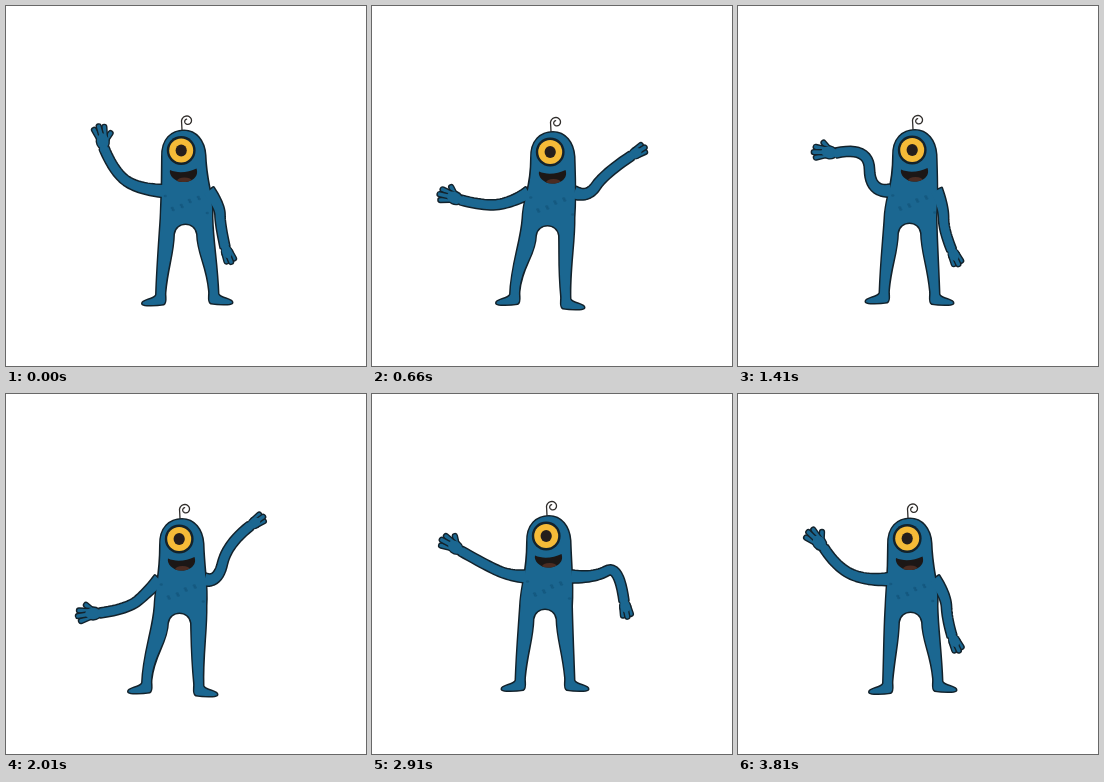
An HTML page with a canvas for the animation above (3870 ms loop, 360 px wide and 360 px high).

```html
<!DOCTYPE html>
<html lang="en">
<head>
<meta charset="utf-8">
<title>Dancing one-eyed creature</title>
<style>
html, body { margin: 0; width: 100%; height: 100%; overflow: hidden; background: #fff; }
canvas { display: block; width: 360px; height: 360px; }
</style>
</head>
<body>
<canvas id="stage" width="360" height="360"></canvas>
<script>
const ctx = document.getElementById('stage').getContext('2d');
const SKIN = '#1b6791', INK = '#13222b', LOOP = 3870;

// step, head x, head top, hip x, crotch y, left ankle x, left sole y, right ankle x, right sole y
const bodyKeys = [
  [0, 178, 124, 180.5, 218, 154.5, 300, 208, 299],
  [14, 181, 125.5, 176.5, 219.5, 142.5, 299.5, 194, 304],
  [29, 177, 123.5, 172.5, 217, 146, 298, 197, 299.5],
  [41, 176, 124.5, 174.5, 219, 140.5, 300, 193, 303],
  [59, 177, 121.5, 174, 215, 148, 297.5, 198, 297.5],
  [69, 171, 123, 170.5, 217, 137.5, 298.5, 189, 299.5],
  [77, 172, 124, 173.5, 218, 149.5, 300.5, 200, 298.5]
];

// step, upper bend x y, lower bend x y, wrist x y, hand direction in degrees
const leftKeys = [
  [0, 130, 183, 107, 164, 98, 142, -96],
  [14, 143, 195, 115, 201, 89, 194, -157],
  [29, 132, 187, 131, 140, 98, 147, -170],
  [41, 142, 198, 122, 215, 94, 219, -180],
  [59, 139, 182, 117, 173, 89, 157, -142],
  [69, 130, 181, 106, 177, 92, 206, 132],
  [77, 129, 187, 99, 174, 86, 154, -127]
];
const rightKeys = [
  [0, 214, 200, 214, 218, 219, 241, 68],
  [14, 216, 192, 232, 168, 259, 150, -32],
  [22, 206, 201, 206, 224, 214, 244, 65],
  [32, 206, 201, 206, 224, 214, 244, 65],
  [41, 212, 189, 221, 150, 244, 132, -35],
  [45, 217, 193, 225, 172, 240, 160, 0],
  [49, 214, 197, 223, 210, 230, 232, 70],
  [59, 222, 184, 247, 170, 252, 207, 78],
  [64, 222, 189, 240, 174, 259, 174, 10],
  [69, 212, 183, 240, 145, 244, 193, 78],
  [77, 208, 201, 209, 225, 214, 242, 65]
];

const mix = (a, b, u) => a + (b - a) * u;
const mixAngle = (a, b, u) => a + Math.atan2(Math.sin(b - a), Math.cos(b - a)) * u;

function findSpan(keys, step) {
  let i = 0;
  while (i < keys.length - 2 && step >= keys[i + 1][0]) i++;
  const u = Math.min(1, (step - keys[i][0]) / (keys[i + 1][0] - keys[i][0]));
  return [keys[i], keys[i + 1], u * u * (3 - 2 * u)];
}

function bodyAt(step) {
  const [a, b, u] = findSpan(bodyKeys, step);
  const [, h, top, p, crotch, lx, ly, rx, ry] = a.map((v, i) => mix(v, b[i], u));
  return { h, top, p, crotch, lx, ly, rx, ry };
}

function shoulder(body, side) {
  return [(body.h + body.p) / 2 + (side < 0 ? -22 : 23.5), body.top + 61];
}

// Turns a keyed arm into a chain of [length, angle] links.
function toChain(key, side) {
  let [x, y] = shoulder(bodyAt(key[0]), side);
  const links = [];
  for (let i = 1; i < 7; i += 2) {
    const dx = key[i] - x, dy = key[i + 1] - y;
    links.push([Math.hypot(dx, dy), Math.atan2(dy, dx)]);
    [x, y] = [key[i], key[i + 1]];
  }
  links.push([0, key[7] * Math.PI / 180]);
  return links;
}

function armAt(keys, step, side, body) {
  const [a, b, u] = findSpan(keys, step);
  const from = toChain(a, side), to = toChain(b, side);
  const points = [shoulder(body, side)];
  let angle = 0;
  from.forEach(([length, dir], i) => {
    const l = mix(length, to[i][0], u), [x, y] = points[i];
    angle = mixAngle(dir, to[i][1], u);
    points.push([x + l * Math.cos(angle), y + l * Math.sin(angle)]);
  });
  return { points, angle, side };
}

function armPath({ points: [s, a, b, w] }) {
  const m = [(a[0] + b[0]) / 2, (a[1] + b[1]) / 2];
  const near = [], far = [], N = 24;
  for (let i = 0; i <= N; i++) {
    const t = i / N, first = t < 0.5, v = first ? t * 2 : t * 2 - 1;
    const [p, c, q] = first ? [s, a, m] : [m, b, w];
    const at = k => (1 - v) ** 2 * p[k] + 2 * v * (1 - v) * c[k] + v * v * q[k];
    const slope = k => (1 - v) * (c[k] - p[k]) + v * (q[k] - c[k]);
    const dx = slope(0), dy = slope(1), d = Math.hypot(dx, dy) || 1;
    const half = 4.3 + 1.6 * (1 - t) ** 4;
    const nx = -dy / d * half, ny = dx / d * half;
    near.push([at(0) + nx, at(1) + ny]);
    far.unshift([at(0) - nx, at(1) - ny]);
  }
  const path = new Path2D();
  near.concat(far).forEach(([x, y]) => path.lineTo(x, y));
  path.closePath();
  return path;
}

function bodyPath({ h, top, p, crotch, lx, ly, rx, ry }) {
  const path = new Path2D(), q = p - 1;
  const curve = (...c) => path.bezierCurveTo(...c);
  path.moveTo(lx - 4, ly - 11);
  curve(lx - 3, ly - 40, p - 27, 235, p - 25.5, 212);
  curve(p - 24.5, 190, h - 21.5, top + 58, h - 21.5, top + 27);
  curve(h - 22, top + 9, h - 12, top + 1, h, top + 1);
  curve(h + 12, top + 1, h + 20, top + 11, h + 21, top + 25);
  curve(h + 22, top + 55, p + 27, 190, p + 25.5, 212);
  curve(p + 26, 235, rx + 3, ry - 40, rx + 4, ry - 11);
  curve(rx + 6, ry - 6, rx + 18, ry - 6, rx + 18, ry - 2.5);
  curve(rx + 18, ry, rx + 3, ry - 1, rx - 3, ry - 2);
  curve(rx - 6, ry - 4, rx - 4, ry - 9, rx - 4.5, ry - 14);
  curve(rx - 7, ry - 40, q + 12.5, crotch + 30, q + 12, crotch + 10);
  curve(q + 10, crotch - 4, q - 10, crotch - 4, q - 12, crotch + 10);
  curve(q - 12.5, crotch + 30, lx + 7, ly - 40, lx + 4.5, ly - 14);
  curve(lx + 4, ly - 9, lx + 6, ly - 4, lx + 3, ly - 2);
  curve(lx - 3, ly - 1, lx - 18, ly, lx - 18, ly - 2.5);
  curve(lx - 18, ly - 6, lx - 6, ly - 6, lx - 4, ly - 11);
  path.closePath();
  return path;
}

function ellipse(x, y, rx, ry, color) {
  ctx.fillStyle = color;
  ctx.beginPath();
  ctx.ellipse(x, y, rx, ry, 0, 0, 7);
  ctx.fill();
}

function finger(x1, y1, x2, y2) {
  for (const [width, color] of [[6.4, INK], [3.6, SKIN]]) {
    ctx.lineWidth = width;
    ctx.strokeStyle = color;
    ctx.beginPath();
    ctx.moveTo(x1, y1);
    ctx.lineTo(x2, y2);
    ctx.stroke();
  }
}

function drawHand({ points, angle, side }) {
  ctx.save();
  ctx.translate(...points[3]);
  ctx.rotate(angle);
  if (side < 0) {
    ellipse(7, -0.5, 9.2, 7.2, INK);
    finger(8, 3, 14, 8);
    finger(10, -4, 19, -8);
    finger(10, 2, 21, 2.5);
    finger(10, -1, 22, -3);
    ellipse(7, -0.5, 7.8, 5.8, SKIN);
  } else {
    ellipse(6, 0, 8, 6.2, INK);
    finger(6, -3, 14, -4);
    finger(6, 3, 14, 4);
    finger(6, 0, 16, 0);
    ellipse(5, 0, 6.8, 4.8, SKIN);
  }
  // Opens the wrist outline into the forearm.
  ellipse(-1, 0, 4, 4.1, SKIN);
  ctx.restore();
}

function drawAntenna(x, top) {
  ctx.strokeStyle = '#302d2b';
  ctx.lineWidth = 1.3;
  ctx.beginPath();
  ctx.moveTo(x, top);
  ctx.lineTo(x - 0.3, top - 6);
  for (let i = 0; i <= 30; i++) {
    const r = 5.8 - i * 0.13, a = Math.PI + i * 0.25;
    ctx.lineTo(x + 5.3 + r * Math.cos(a), top - 9 + r * Math.sin(a));
  }
  ctx.stroke();
}

function drawFace(h, top) {
  const ex = h - 2.8, ey = top + 20.5;
  ellipse(ex, ey, 14.4, 14.4, INK);
  ellipse(ex, ey, 12, 12, '#f5bb38');
  ellipse(ex, ey, 5.6, 6, '#251e1c');

  ctx.save();
  ctx.translate(h - 0.5, top + 44.5);
  ctx.beginPath();
  ctx.moveTo(-13.5, -4.5);
  ctx.bezierCurveTo(-6, -1, 5, -2, 13, -6);
  ctx.bezierCurveTo(16, 3, 7, 8, 0, 7.5);
  ctx.bezierCurveTo(-8, 8, -15, 1, -13.5, -4.5);
  ctx.fillStyle = '#1c1716';
  ctx.fill();
  ctx.clip();
  ellipse(1, 6.5, 7.5, 3.5, '#4b2c22');
  ctx.restore();
}

function drawFreckles({ h, p, top }) {
  const x = (h + p) / 2;
  for (let i = 0; i < 10; i++) {
    const dx = (i * 17) % 43 - 20, dy = 66 + (i * 11) % 19;
    ellipse(x + dx, top + dy, 1.6, 1.3, 'rgba(12,65,100,.35)');
  }
}

function draw(step) {
  const body = bodyAt(step);
  const arms = [armAt(leftKeys, step, -1, body), armAt(rightKeys, step, 1, body)];
  const paths = [bodyPath(body), ...arms.map(armPath)];
  ctx.fillStyle = '#fff';
  ctx.fillRect(0, 0, 360, 360);
  ctx.lineCap = ctx.lineJoin = 'round';
  drawAntenna(body.h - 2, body.top);
  ctx.strokeStyle = INK;
  ctx.lineWidth = 3;
  paths.forEach(path => ctx.stroke(path));
  ctx.fillStyle = SKIN;
  paths.forEach(path => ctx.fill(path));
  arms.forEach(drawHand);
  drawFreckles(body);
  drawFace(body.h, body.top);
}

// Poses advance every 49.8 ms, shown on a 30 ms beat.
function stepAt(time) {
  const beat = Math.floor(time % LOOP / 30) * 30;
  return Math.floor((beat - 3.71) / 49.8) + 1;
}

const start = performance.now();
function tick() {
  draw(stepAt(performance.now() - start));
  requestAnimationFrame(tick);
}
tick();
</script>
</body>
</html>
```
